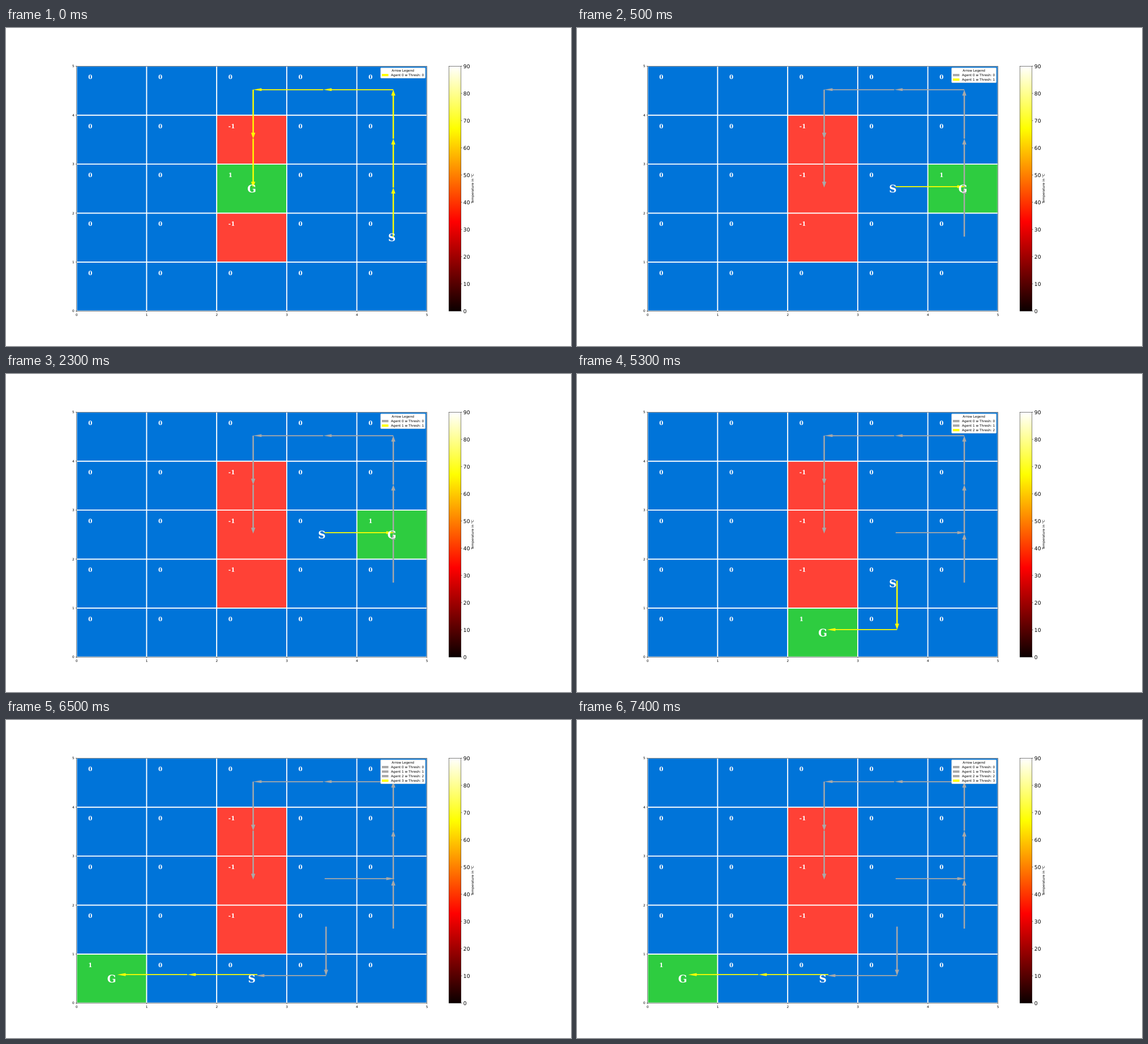
Recreate the animation shown at these times as an HTML page. Size 998 px wide and 561 px high, loop 8 s.

```html
<!DOCTYPE html>
<html lang="en">
<head>
<meta charset="utf-8">
<title>Grid world agents</title>
<style>
  html, body { margin: 0; width: 100%; height: 100%; overflow: hidden; background: #fff; }
  svg { display: block; width: 998px; height: 561px; }
  text { font: 5.77px "DejaVu Sans", sans-serif; text-rendering: geometricPrecision; }
  .bar { font-size: 9.23px; }
  .value, .mark { font: bold 10.4px "DejaVu Serif", "Noto Serif", serif; fill: #fff; }
  .mark { font-size: 18.46px; }
  .mid { text-anchor: middle; }
  .end { text-anchor: end; }
  .line { fill: none; stroke: #000; stroke-width: .5; }
</style>
</head>
<body>
<svg viewBox="0 0 998 561">
  <defs>
    <clipPath id="area"><rect x="124.75" y="67.3" width="618.75" height="432"/></clipPath>
    <linearGradient id="hot" x1="0" y1="1" x2="0" y2="0">
      <stop stop-color="#0b0000"/>
      <stop offset=".365" stop-color="#f00"/>
      <stop offset=".746" stop-color="#ff0"/>
      <stop offset="1" stop-color="#fff"/>
    </linearGradient>
  </defs>
  <g id="scene"></g>
  <g id="axes"></g>
  <g id="legend"></g>
</svg>
<script>
const LEFT = 124.75, TOP = 67.3, RIGHT = 743.5, BOTTOM = 499.3;
const CELL_W = 123.75, CELL_H = 86.4;
const BLUE = '#0074d9', RED = '#ff4136', GREEN = '#2ecc40', YELLOW = '#ff0', GREY = '#a9a9a9';
const STARTS = [0, 500, 3500, 6500], LOOP = 8000;
const MOVES = { U: [0, 1], D: [0, -1], L: [-1, 0], R: [1, 0] };
const AGENTS = [
  { start: [4, 1], path: 'UUULLDD' },
  { start: [3, 2], path: 'R' },
  { start: [3, 1], path: 'DL' },
  { start: [2, 0], path: 'LL' }
];

const $ = id => document.getElementById(id);
const px = x => LEFT + x * CELL_W;
const py = y => BOTTOM - y * CELL_H;
const text = (x, y, str, cls = '') => `<text x="${x}" y="${y}" class="${cls}">${str}</text>`;
const rect = (x, y, w, h, attrs) =>
  `<rect x="${x}" y="${y}" width="${w}" height="${h}" ${attrs}/>`;

function steps({ start, path }) {
  let [x, y] = start;
  return [...path].map(move => {
    const [dx, dy] = MOVES[move];
    const step = { x, y, dx, dy };
    x += dx;
    y += dy;
    return step;
  });
}

// Arrow of unit length; sizes are in cell units
function arrow({ x, y, dx, dy }, shift, color) {
  const outline = [[0, .01], [.88, .01], [.88, .03], [1, 0], [.88, -.03], [.88, -.01], [0, -.01]];
  const points = outline.map(([along, side]) =>
    [px(x + shift + along * dx - side * dy), py(y + shift + along * dy + side * dx)]);
  return `<polygon points="${points.join(' ')}" fill="${color}"/>`;
}

function drawAxes() {
  let out = '', ticks = '';
  for (let i = 0; i <= 5; i++) {
    ticks += `M${px(i)} ${BOTTOM}v2M${LEFT} ${py(i)}h-2`;
    out += text(px(i), 507.7, i, 'mid') + text(120.7, py(i) + 2.1, i, 'end');
  }
  out += rect(782.2, TOP, 21.6, 432, 'fill="url(#hot)"');
  for (let t = 0; t <= 90; t += 10) {
    const y = BOTTOM - t * 4.8;
    ticks += `M803.8 ${y}h2`;
    out += text(807.85, y + 3.36, t, 'bar');
  }
  out += rect(LEFT, TOP, RIGHT - LEFT, 432, 'class="line"')
    + rect(782.2, TOP, 21.6, 432, 'class="line"')
    + `<path d="${ticks}" class="line"/>`
    + '<text class="mid" transform="translate(826.1 283.3) rotate(-90)">Temperature in °C</text>';
  $('axes').innerHTML = out;
}

function drawScene(current) {
  const agent = AGENTS[current];
  const last = steps(agent).pop();
  const goal = [last.x + last.dx, last.y + last.dy];
  let cells = '', labels = '', arrows = '';

  for (let x = 0; x < 5; x++) {
    for (let y = 0; y < 5; y++) {
      const isGoal = x === goal[0] && y === goal[1];
      const isTrap = x === 2 && y >= 1 && y <= 3;
      const color = isGoal ? GREEN : isTrap ? RED : BLUE;
      cells += rect(px(x), py(y + 1), CELL_W, CELL_H, `fill="${color}" stroke="#fff" stroke-width="1.7"`);
      labels += text(px(x) + 20.6, py(y + 1) + 22.9, isGoal ? 1 : isTrap ? -1 : 0, 'value');
    }
  }
  for (let i = 0; i <= current; i++) {
    const color = i === current ? YELLOW : GREY;
    for (const step of steps(AGENTS[i])) arrows += arrow(step, .52 + i * .02, color);
  }
  const mark = ([x, y], letter) => text(px(x + .5), py(y + .5) + 6.7, letter, 'mark mid');
  $('scene').innerHTML = `<g clip-path="url(#area)">${cells}</g>` + arrows + labels
    + mark(agent.start, 'S') + mark(goal, 'G');
}

function drawLegend(current) {
  let out = rect(661.7, 70.2, 78.9, 18.3 + current * 8, 'rx="1.15" fill="#fff" stroke="#ccc" stroke-width=".58"')
    + text(701.1, 77.2, 'Arrow Legend', 'mid');
  for (let i = 0; i <= current; i++) {
    const y = 85.1 + i * 8;
    out += rect(664, y - 4.1, 11.5, 4.1, `fill="${i === current ? YELLOW : GREY}"`)
      + text(680.1, y, `Agent ${i} w Thresh: ${i}`);
  }
  $('legend').innerHTML = out;
}

let shown = -1;
function tick() {
  const time = performance.now() % LOOP;
  const current = STARTS.filter(start => start <= time).length - 1;
  if (current !== shown) {
    shown = current;
    drawScene(current);
    drawLegend(current);
  }
  requestAnimationFrame(tick);
}

drawAxes();
tick();
</script>
</body>
</html>
```
